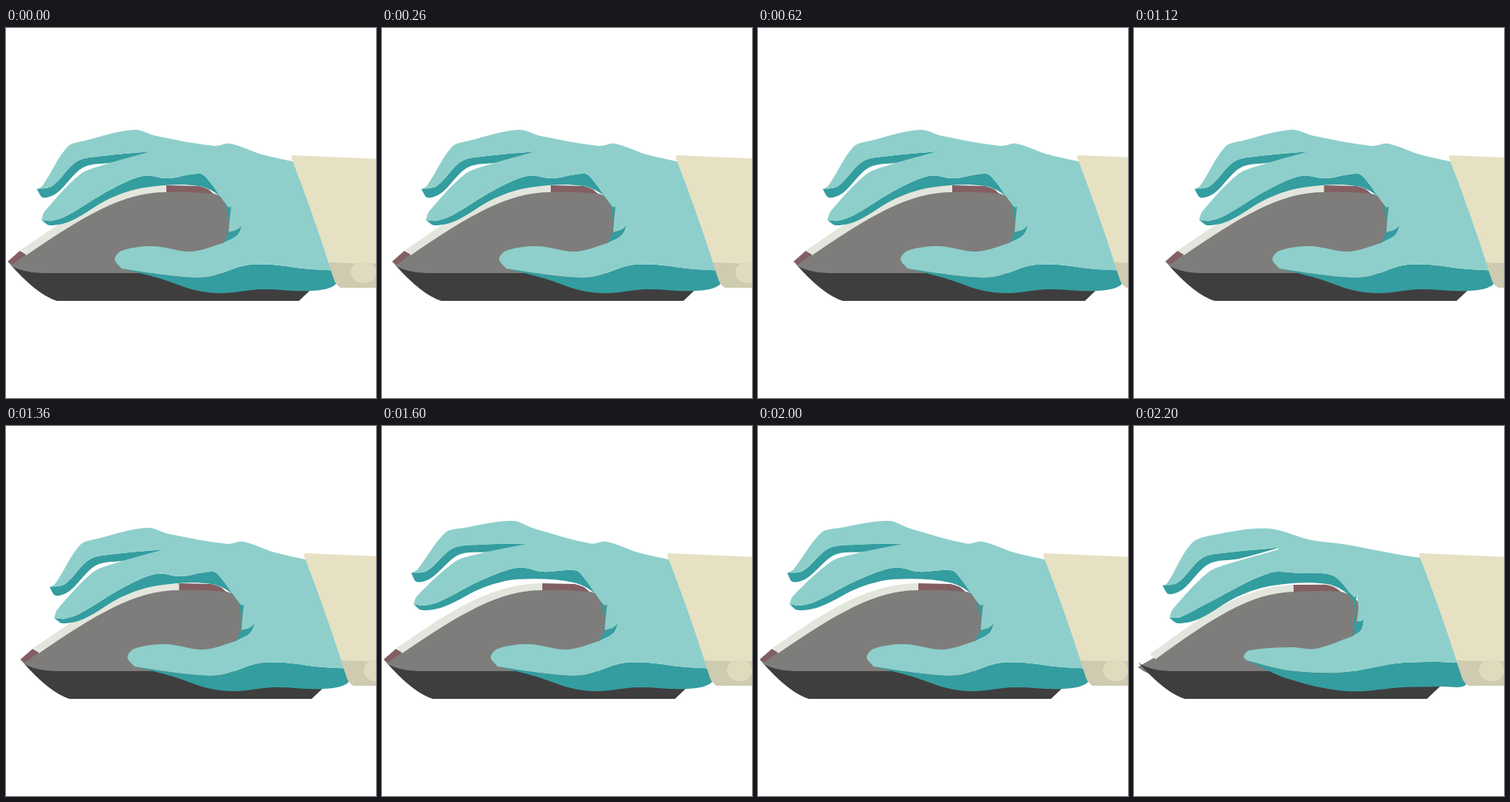
Write an HTML page that moves like this. It is 480x480 px and loops after 2300 ms.

```html
<!DOCTYPE html>
<html lang="en">
<head>
<meta charset="utf-8">
<title>Hand on mouse</title>
<style>
html, body { margin: 0; width: 100%; height: 100%; overflow: hidden; background: #fff; }
svg { display: block; width: 100vw; height: 100vh; }
</style>
</head>
<body>
<svg viewBox="0 0 480 480">
  <g id="scene">
    <g id="shell">
      <path fill="#7e7d7b" d="M3 304 L24 293 C100 245 150 212 209 212 H250 C278 212 298 227 298 247 C298 275 270 294 238 294 L200 320 H48 Q15 317 3 304 Z"/>
      <path fill="#835f63" d="M207 204 L250 205 Q262 207 269 215 Q240 212 207 213 Z"/>
      <path fill="#e3e6dc" d="M19 288 C70 255 130 205 208 204 V213 C150 213 100 245 26 295 Z"/>
    </g>
    <path fill="#3f3e3f" d="M5 306 Q17 317 48 318 H398 V337 L380 354 H66 Q40 346 5 306 Z"/>
    <path id="tip" fill="#835f63" d="M2 303 L18 289 L26 294 L8 307 Z"/>
    <path id="dark" fill="#349d9f"/>
    <path id="light" fill="#8ecfcb"/>
    <path fill="#e6e1c3" d="M371 165 L530 172 V306 H419 Q396 235 370 168 Z"/>
    <path fill="#cfcbb1" d="M418 304 Q450 306 530 305 V337 H434 Q428 333 426 328 Z"/>
    <ellipse cx="464" cy="317" rx="16.5" ry="14" fill="#e0dbbd"/>
  </g>
</svg>
<script>
const LOOP = 2300, STEP = 60, SHIFT = 5.5, MOVES = 8;
const $ = id => document.getElementById(id);

// Edges of the hand, each a smooth line through a few key points.
const rest = {
  top: '40,209 47,205 80,154 103,146 166,132 195,140 270,153 291,150 332,164 380,175',
  palmLine: '432,315 385,312 345,307 310,308 262,323 220,322 150,312',
  thumb: '150,312 141,300 150,289 190,283 240,290 282,279',
  wedge: '282,279 300,269 307,255',
  wedgeTop: '307,255 300,261 289,265',
  inner: '289,265 290,250 292,232',
  nearLine: '292,232 288,232 264,199 252,189 210,195 178,192 135,210 80,243 60,250 46,249',
  nearTop: '46,249 50,238 96,190 122,179 188,160',
  farLine: '188,160 125,166 92,173 60,205 40,209',
  farLow: '40,209 48,220 66,214 100,181 140,174 188,161',
  nearLow: '46,249 57,256 85,250 135,221 180,207 250,205 281,222 288,252 283,279',
  palmLow: '150,312 200,325 245,340 280,344 332,339 395,341 426,334 432,315'
};

const press = {
  ...rest,
  top: '36,207 43,204 75,152 105,141 174,133 230,148 270,153 345,167 380,172',
  palmLine: '430,307 380,306 340,308 268,320 200,317 146,304',
  thumb: '146,304 142,299 150,291 205,287 235,289 283,273',
  wedge: '283,273 295,264 298,251',
  wedgeTop: '298,251 295,253 289,254',
  inner: '289,254 291,235 289,217',
  nearLine: '289,217 286,222 258,194 215,191 175,191 95,230 60,248 46,249',
  farLine: shift(rest.farLine, -3, -2),
  farLow: shift(rest.farLow, -3, -2),
  palmLow: '146,304 200,328 275,344 350,339 400,338 430,336 430,307'
};

const fingers = ['top', 'nearLine', 'nearTop', 'farLine', 'farLow', 'nearLow'];

function parse(line) {
  return line.split(' ').map(s => s.split(',').map(Number));
}

function shift(line, dx, dy) {
  return parse(line).map(([x, y]) => `${x + dx},${y + dy}`).join(' ');
}

// Turns the fingers up about the knuckles, fading out towards the wrist.
function lift([x, y], degrees) {
  const u = Math.min(1, Math.max(0, (310 - x) / 100));
  const a = degrees * Math.PI / 180 * u * u * (3 - 2 * u);
  const dx = x - 290, dy = y - 170;
  return [290 + dx * Math.cos(a) - dy * Math.sin(a),
          170 + dx * Math.sin(a) + dy * Math.cos(a)];
}

// Spline whose tangents are scaled to each span, so uneven points stay smooth.
function curve(p) {
  const gap = (a, b) => Math.hypot(b[0] - a[0], b[1] - a[1]) || 1;
  const tangent = i => {
    const a = p[i - 1] || p[i], c = p[i + 1] || p[i];
    const length = (p[i - 1] ? gap(a, p[i]) : 0) + (p[i + 1] ? gap(p[i], c) : 0);
    return [0, 1].map(k => (c[k] - a[k]) / length);
  };
  let d = '';
  for (let i = 0; i < p.length - 1; i++) {
    const b = p[i], c = p[i + 1], s = gap(b, c) / 3;
    const m = tangent(i), n = tangent(i + 1);
    const ends = [b[0] + m[0] * s, b[1] + m[1] * s, c[0] - n[0] * s, c[1] - n[1] * s, ...c];
    d += 'C' + ends.map(v => v.toFixed(2)).join(' ');
  }
  return d;
}

function makePose(edges, degrees) {
  const pts = {};
  for (const key in edges) {
    const turn = fingers.includes(key) ? degrees : 0;
    pts[key] = parse(edges[key]).map(p => lift(p, turn));
  }
  const shape = (...keys) => 'M' + pts[keys[0]][0].join(' ') +
    keys.map(k => 'L' + pts[k][0].join(' ') + curve(pts[k])).join('') + 'Z';
  return {
    dark: shape('farLine', 'farLow') + shape('nearLine', 'nearLow') +
      shape('wedge', 'wedgeTop') + shape('palmLine', 'palmLow'),
    light: shape('top', 'palmLine', 'thumb', 'wedge', 'wedgeTop', 'inner',
      'nearLine', 'nearTop', 'farLine')
  };
}

const poses = {
  rest: makePose(rest, 0),
  half: makePose(rest, 4.2),
  high: makePose(rest, 10.5),
  press: makePose(press, 0)
};
const click = ['half', 'high', 'press', 'rest'];

const stepsSince = (t, start) =>
  Math.min(MOVES, Math.max(0, Math.floor((t - start) / STEP) + 1));

let shown;
function show(name) {
  if (name === shown) return;
  shown = name;
  const down = name === 'press';
  $('dark').setAttribute('d', poses[name].dark);
  $('light').setAttribute('d', poses[name].light);
  $('tip').setAttribute('visibility', down ? 'hidden' : 'visible');
  $('shell').setAttribute('transform', down ? 'translate(-1 2) rotate(-1.8 208 208)' : '');
}

function draw(t) {
  const x = SHIFT * (stepsSince(t, 200) - stepsSince(t, 1120));
  $('scene').setAttribute('transform', `translate(${x} 0)`);
  show(t < 1600 ? 'rest' : click[Math.floor((t - 1600) / 100) % click.length]);
}

const begin = performance.now();
function tick() {
  draw((performance.now() - begin) % LOOP);
  requestAnimationFrame(tick);
}
tick();
</script>
</body>
</html>
```
